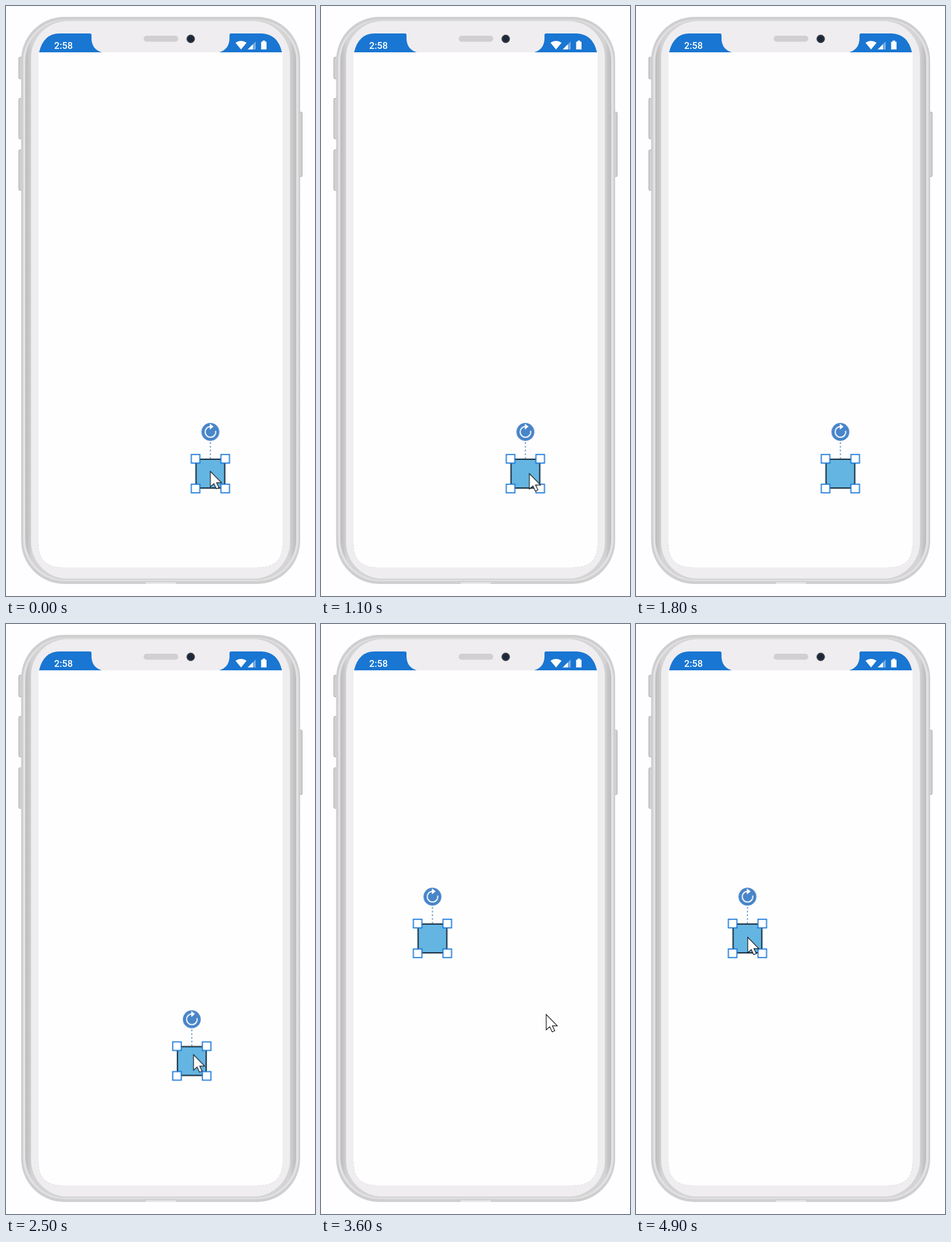
Recreate the animation shown at these times as an HTML page. Size 542 by 1032 pixels, loop 5 s.

```html
<!DOCTYPE html>
<html lang="en">
<head>
<meta charset="utf-8">
<title>Dragging a node on a phone</title>
<style>
  html, body { margin: 0; width: 100%; height: 100%; overflow: hidden; background: #fefdff; }
  svg { display: block; width: 542px; height: 1032px; }
  .clock { font: 500 16.5px Roboto, "Open Sans", sans-serif; fill: #fff; }

  /* Poses are held for 100 ms (2%); longer moves use more steps. */
  #node, #pointer { animation: 5s steps(1) infinite; }
  #node { animation-name: node; }
  #pointer { animation-name: pointer; }

  @keyframes node {
    0% { transform: translate(358.5px, 818px); animation-timing-function: steps(2); }
    4% { transform: translate(414px, 846px); }
    6% { transform: translate(434px, 860px); }
    8% { transform: translate(440px, 866px); }
    10% { transform: translate(358.5px, 818px); }
    24% { transform: translate(358.5px, 818px); animation-timing-function: steps(3); }
    30% { transform: translate(240.5px, 907.5px); }
    34% { transform: translate(358.5px, 818px); }
    48% { transform: translate(358.5px, 818px); animation-timing-function: steps(5); }
    58% { transform: translate(195.5px, 550px); }
    60% { transform: translate(195.5px, 550px); animation-timing-function: steps(3); }
    66% { transform: translate(430px, 645px); }
    68% { transform: translate(447px, 660px); }
    70% { transform: translate(195.5px, 550px); }
    78% { transform: translate(195.5px, 550px); animation-timing-function: steps(3); }
    84% { transform: translate(236px, 850px); }
    86% { transform: translate(240.5px, 907.5px); }
    90%, 100% { transform: translate(195.5px, 550px); }
  }

  @keyframes pointer {
    0% { transform: translate(358.5px, 814px); animation-timing-function: steps(3); }
    6% { transform: translate(465px, 866px); }
    8% { transform: translate(500px, 880px); }
    14% { transform: translate(490px, 906px); }
    16% { transform: translate(462px, 906px); animation-timing-function: steps(2); }
    20% { transform: translate(378px, 830px); }
    22% { transform: translate(365.5px, 818px); }
    24% { transform: translate(365.5px, 818px); animation-timing-function: steps(3); }
    30% { transform: translate(247px, 955px); }
    32% { transform: translate(247px, 1000px); }
    40% { transform: translate(300px, 990px); animation-timing-function: steps(4); }
    48% { transform: translate(361.5px, 807px); animation-timing-function: steps(5); }
    58% { transform: translate(198.5px, 539px); }
    60% { transform: translate(198.5px, 539px); animation-timing-function: steps(3); }
    66% { transform: translate(465px, 650px); }
    68% { transform: translate(500px, 670px); }
    70% { transform: translate(466px, 682px); }
    72% { transform: translate(395px, 683px); animation-timing-function: steps(3); }
    78% { transform: translate(202px, 550px); animation-timing-function: steps(3); }
    84% { transform: translate(243px, 860px); }
    86% { transform: translate(246.5px, 979px); }
    88% { transform: translate(250px, 1000px); }
    92% { transform: translate(262px, 945px); animation-timing-function: steps(2); }
    96% { transform: translate(215px, 580px); }
    98%, 100% { transform: translate(196px, 548px); }
  }
</style>
</head>
<body>
<svg viewBox="0 0 542 1032">
  <defs>
    <linearGradient id="rim" gradientUnits="userSpaceOnUse" x1="34" x2="509" y1="0" y2="0">
      <stop offset="0" stop-color="#bdbdbe"/>
      <stop offset=".012" stop-color="#c6c6c7"/>
      <stop offset=".024" stop-color="#d4d4d5"/>
      <stop offset=".976" stop-color="#d4d4d5"/>
      <stop offset=".988" stop-color="#c6c6c7"/>
      <stop offset="1" stop-color="#bdbdbe"/>
    </linearGradient>
    <clipPath id="screen">
      <path d="M57 81V942Q57 982 99 982H443Q485 982 485 942V81Z"/>
    </clipPath>
    <rect id="grip" x="-7.5" y="-7.5" width="15" height="15" fill="#fff" stroke="#1877d8" stroke-width="1.9"/>
  </defs>

  <!-- side buttons -->
  <g fill="#d0d0d1" stroke="#a9a9aa">
    <rect x="22.5" y="89.5" width="8" height="38" rx="2"/>
    <rect x="22.5" y="161.5" width="8" height="71" rx="2"/>
    <rect x="22.5" y="251.5" width="8" height="71" rx="2"/>
    <rect x="511.5" y="185.5" width="8" height="113" rx="2"/>
  </g>

  <!-- body -->
  <rect x="26.5" y="19" width="489.5" height="992" rx="76" fill="#cfcfd0"/>
  <rect x="30" y="24" width="483" height="982" rx="73" fill="#e2e1e3"/>
  <rect x="34" y="25" width="475" height="979" rx="71" fill="url(#rim)"/>
  <rect x="44" y="26.5" width="454" height="975" rx="64" fill="#efedf0"/>
  <rect x="245" y="1008" width="53" height="3" fill="#e6e5e7"/>

  <!-- screen -->
  <path d="M57 81V942Q57 982 99 982H443Q485 982 485 942V81Z" fill="#fffeff"/>
  <path d="M57 942Q57 982 99 982M443 982Q485 982 485 942" fill="none" stroke="#dddcde" stroke-dasharray="3 3"/>
  <path d="M58 81Q66 48 94 48H147Q150 48 150 51V58Q151 76 168 81Z
           M374 81Q391 76 392 58V51Q392 48 395 48H448Q477 49 484 81Z" fill="#1976d2"/>
  <rect x="241.5" y="52" width="60.5" height="10.5" rx="5" fill="#d0cfd1"/>
  <circle cx="324" cy="57.5" r="7.2" fill="#292c35" stroke="#85868b" stroke-width=".8"/>
  <circle cx="324" cy="57.5" r="3.5" fill="#142a40"/>

  <!-- status bar -->
  <text class="clock" x="84.5" y="75">2:58</text>
  <g fill="#fff">
    <path d="M412.3 76 402.5 64.3Q412.3 57.5 422 64.3Z"/>
    <path d="M424 76H438V62Z" opacity=".4"/>
    <path d="M424 76H433V67Z"/>
    <path d="M447.5 62.5H450V60.5H454.500V62.5H457V76H447.5Z"/>
  </g>

  <g clip-path="url(#screen)">
    <g id="node">
      <rect x="-25.2" y="-25.2" width="50.4" height="50.4" fill="#64b5e1" stroke="#10161c" stroke-width="2"/>
      <rect x="-26" y="-26" width="52" height="52" fill="none" stroke="#3b82bd" stroke-width="1.2" stroke-dasharray="2.5 3.5"/>
      <path d="M0-26V-57" stroke="#4a80b4" stroke-width="1.5" stroke-dasharray="3 3.5"/>
      <circle cy="-73" r="15.7" fill="#4885c9"/>
      <path d="M9.200-75A9.300 9.300 0 1 1-1-82.200" fill="none" stroke="#fff" stroke-width="2"/>
      <path d="M-1-87.500 5.500-82.200-1-77Z" fill="#fff"/>
      <use href="#grip" x="-26" y="-26"/>
      <use href="#grip" x="26" y="-26"/>
      <use href="#grip" x="-26" y="26"/>
      <use href="#grip" x="26" y="26"/>
    </g>
    <path id="pointer" d="M0 0V27L6.200 21.500 10.500 30.500 15 28.500 10.800 19.800H19.500Z" fill="#fff" stroke="#111" stroke-width="1.200"/>
  </g>
</svg>
</body>
</html>
```
